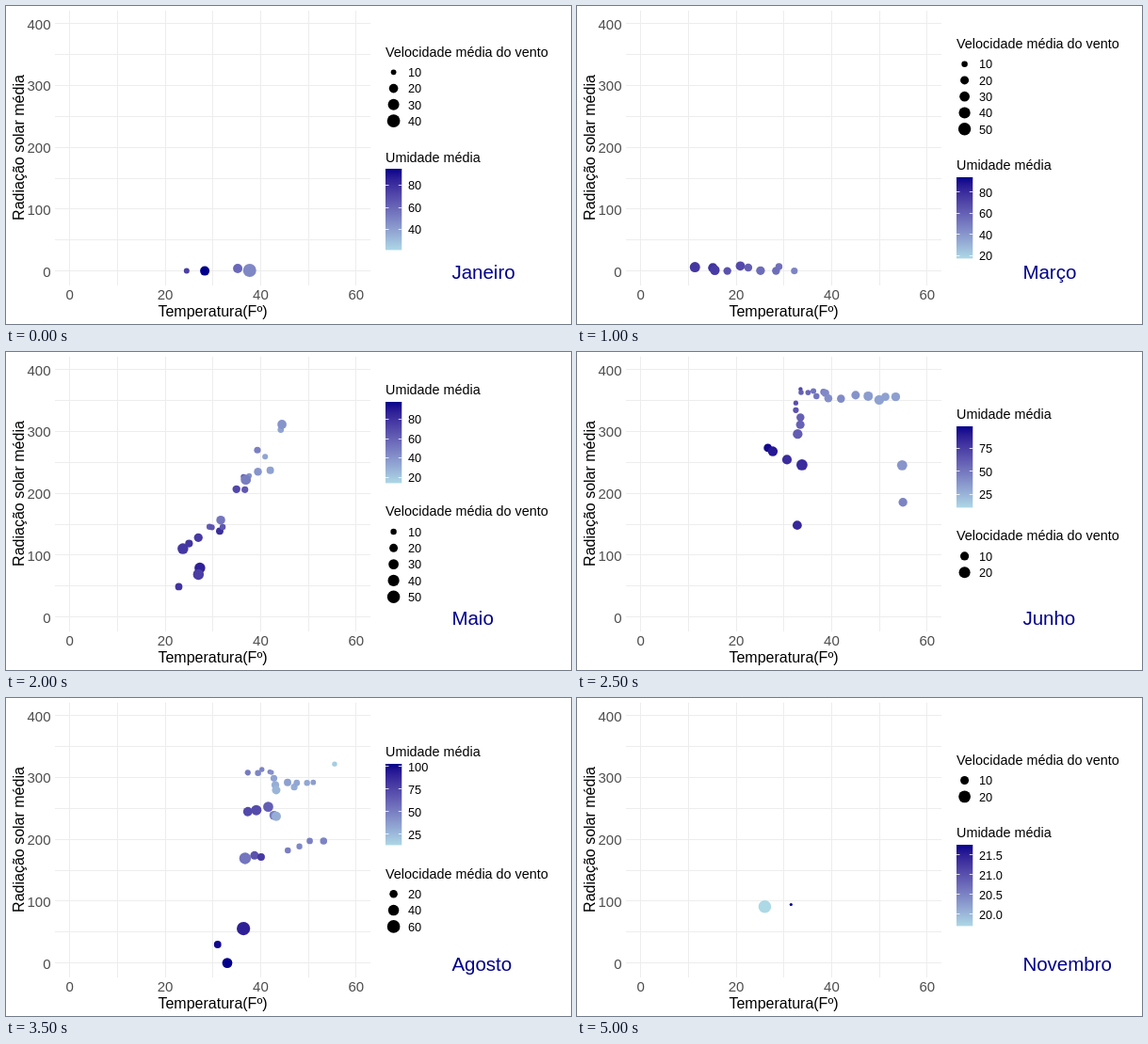
Recreate the animation shown at these times as an HTML page. Size 600 by 338 pixels, loop 5.5 s.

```html
<!DOCTYPE html>
<html lang="pt">
<head>
<meta charset="utf-8">
<style>
html, body { margin: 0; width: 100%; height: 100%; overflow: hidden; background: #fff; }
svg { display: block; width: 600px; height: 338px; font-family: "Liberation Sans", Arial, sans-serif; }
.grid { stroke: #ededed; shape-rendering: crispEdges; }
.axis { font-size: 15px; fill: #4d4d4d; }
.name { font-size: 16px; text-anchor: middle; }
.title { font-size: 14.4px; }
.label { font-size: 12.8px; }
.month { font-size: 20.5px; fill: #00008b; }
</style>
</head>
<body>
<svg id="stage" viewBox="0 0 600 338"></svg>
<script>
const STEP = 500, KEY = 17.28, BAR = 5 * KEY, LEFT = 403, HEAD = 13, GAP = 30;

const px = temp => 67.6 + 5.07 * temp;
const py = sun => 281.6 - .657 * sun;
const shade = p => `color-mix(in lab, #00008b ${p}%, #add8e6)`;
const text = (x, y, s, cls, more = '') => `<text x="${x}" y="${y}" class="${cls}" ${more}>${s}</text>`;
const dot = (x, y, r, fill) => `<circle cx="${x}" cy="${y}" r="${r}" fill="${fill}"/>`;
const range = (n, f) => Array.from({ length: n }, (_, i) => f(i));
const clamp = (v, lo, hi) => Math.min(hi, Math.max(lo, v));

// humidity and wind: lowest, highest, label step.
// strands: dot count, then key points of temperature, radiation, radius, darkness %.
const months = [
  { name: 'Janeiro', windFirst: true, humidity: [21.4, 94.9, 20], wind: [8, 41, 10], spread: 0,
    strands: [[4, [24.5, 0, 3, 72], [28.3, 0, 5, 100], [35.2, 4, 5, 52], [37.7, 1, 7, 37]]] },
  { name: 'Fevereiro', humidity: [13.4, 98.1, 20], wind: [9, 24, 5], spread: 0,
    strands: [[2, [12.6, 0, 3, 95], [12, 0, 5.5, 48]],
      [3, [19.6, 0, 4.5, 22], [21.2, 0, 6, 6], [25.8, 0, 4.5, 22]],
      [2, [29.9, 3, 1.6, 0], [32.8, 0, 6.8, 37]]] },
  { name: 'Março', windFirst: true, humidity: [17.4, 94.2, 20], wind: [5, 55, 10], spread: 1,
    strands: [[10, [12, 0, 5, 80], [32, 6, 4, 40]]] },
  { name: 'Abril', windFirst: true, humidity: [17.4, 94.2, 20], wind: [5, 55, 10], spread: 0,
    strands: [[4, [7, 0, 6.2, 92], [14.2, 0, 6.8, 75], [18.6, 0, 5.7, 82]],
      [3, [21.8, 15, 3, 42], [31.6, 40, 4.3, 38]],
      [4, [32.4, 13, 4.3, 75], [32.2, 35, 3.6, 10], [33, 57, 1.5, 36]]] },
  { name: 'Maio', humidity: [14, 98, 20], wind: [5, 55, 10], spread: 3,
    strands: [[22, [24, 60, 5, 85], [32, 180, 4, 55], [46, 300, 4, 25]]] },
  { name: 'Junho', humidity: [10.5, 99, 25], wind: [1, 29, 10], spread: .8,
    strands: [[1, [33, 144, 4.6, 85]], [4, [26, 272, 4.6, 96], [33, 243, 5.8, 78]],
      [6, [33, 298, 5, 55], [33, 364, 2.2, 65]],
      [13, [34, 362, 2.8, 52], [40, 358, 4.2, 36], [54, 354, 5, 22]],
      [2, [54.6, 245, 5.6, 34], [55, 184, 4.6, 42]]] },
  { name: 'Julho', windFirst: true, humidity: [10, 96, 25], wind: [8, 41, 10], spread: 3,
    strands: [[28, [36, 200, 5, 75], [42, 310, 4, 45], [54, 370, 4, 25]]] },
  { name: 'Agosto', humidity: [13, 103, 25], wind: [5, 63, 20], spread: .7,
    strands: [[3, [31, 33, 4.2, 98], [32.5, 0, 5.5, 100], [36, 54, 7, 90]],
      [3, [37, 172, 5.8, 45], [40, 172, 3.8, 78]],
      [5, [37.5, 240, 5.2, 70], [41, 248, 5.6, 58], [43.4, 237, 4.6, 18]],
      [8, [38, 305, 3.2, 40], [42, 312, 2.6, 36], [43, 283, 4.5, 15]],
      [5, [45, 288, 4, 22], [51, 288, 3, 26]], [1, [56, 323, 2.6, 8]],
      [4, [46, 182, 3.3, 42], [52.5, 202, 3.8, 36]]] },
  { name: 'Setembro', windFirst: true, humidity: [14.6, 101, 20], wind: [1, 63, 20], spread: 1.2,
    strands: [[1, [32.4, 13, 6.7, 97]],
      [10, [21.5, 105, 3, 65], [21, 200, 3.8, 92], [28, 238, 3.3, 70]],
      [5, [27, 185, 4, 60], [33, 150, 5.6, 60], [36, 180, 6.2, 54]],
      [12, [32, 203, 5, 60], [38, 210, 4, 35], [52, 238, 3, 10]]] },
  { name: 'Outubro', windFirst: true, humidity: [15, 99, 20], wind: [1, 63, 20], spread: 3,
    strands: [[24, [16, 70, 4, 90], [26, 130, 4, 60], [42, 165, 4, 20]]] },
  { name: 'Novembro', windFirst: true, humidity: [19.7, 21.76, .5], wind: [4, 24, 10], spread: 0,
    strands: [[2, [26, 91, 6.8, 0], [31.5, 94.5, 1.6, 100]]] }
];

// Point at t (0 to 1) on the polyline through the keys
function along(keys, t) {
  const pos = t * (keys.length - 1), i = Math.floor(pos);
  const a = keys[i], b = keys[i + 1] || a;
  return a.map((v, k) => v + (b[k] - v) * (pos - i));
}

function drawDots({ strands, spread }, month) {
  let seed = 7919 * (month + 1);
  const noise = () => ((seed = seed * 16807 % 2147483647) / 2147483647 * 2 - 1) * spread;
  return strands.flatMap(([n, ...keys]) => range(n, i => {
    const [temp, sun, r, dark] = along(keys, n > 1 ? i / (n - 1) : 0);
    return dot(px(temp + noise()), py(Math.max(0, sun + 7 * noise())),
      r * (1 + .12 * noise()), shade(clamp(dark + 5 * noise(), 0, 100)));
  })).join('');
}

// Round values between lo and hi
function breaks([lo, hi, step]) {
  const first = Math.ceil(lo / step);
  return range(Math.floor(hi / step) - first + 1, i => (first + i) * step);
}

function humidityLegend(y, scale) {
  const [lo, hi, step] = scale, top = Math.round(y + HEAD - .4);
  return text(LEFT, y + 5, 'Umidade média', 'title') +
    `<rect x="${LEFT}" y="${top}" width="${KEY}" height="${BAR}" fill="url(#scale)"/>` +
    breaks(scale).map(v => {
      const ty = top + (hi - v) / (hi - lo) * BAR;
      return `<path d="M${LEFT} ${Math.floor(ty) + .5}h3.5m10.3 0h3.5" stroke="#fff" stroke-width=".8"/>` +
        text(427, ty + 4.8, v.toFixed(step < 1 ? 1 : 0), 'label');
    }).join('');
}

function windLegend(y, scale) {
  const [lo, hi] = scale;
  return text(LEFT, y + 5, 'Velocidade média do vento', 'title') + breaks(scale).map((v, i) => {
    const ky = y + HEAD + KEY * (i + .5);
    const r = 1.5 + 5.5 * Math.sqrt((v - lo) / (hi - lo));
    return dot(411.6, ky, r, '#000') + text(427, ky + 4.8, v, 'label');
  }).join('');
}

function drawMonth(month, index) {
  const { name, windFirst, humidity, wind } = month;
  const windHeight = HEAD + KEY * breaks(wind).length, barHeight = HEAD + BAR;
  const top = 154.4 - (windHeight + barHeight + GAP) / 2;
  return drawDots(month, index) +
    humidityLegend(windFirst ? top + windHeight + GAP : top, humidity) +
    windLegend(windFirst ? top : top + barHeight + GAP, wind) +
    text(473.4, 290, name, 'month');
}

function drawAxes() {
  const stops = range(17, i =>
    `<stop offset="${i / 16}" style="stop-color:${shade(100 - i * 6.25)}"/>`).join('');
  const lines = range(7, i => `M${Math.floor(px(i * 10)) + .5} 5V297`).join('') +
    range(9, i => `M52 ${Math.floor(py(i * 50)) + .5}H387`).join('');
  return `<defs><linearGradient id="scale" x2="0" y2="1">${stops}</linearGradient></defs>` +
    `<path d="${lines}" class="grid"/>` +
    range(4, i => text(px(i * 20), 312, i * 20, 'axis', 'text-anchor="middle"')).join('') +
    range(5, i => text(47.5, py(i * 100) + 5.9, i * 100, 'axis', 'text-anchor="end"')).join('') +
    text(219.5, 330, 'Temperatura(Fº)', 'name') +
    text(0, 0, 'Radiação solar média', 'name', 'transform="translate(18.8 150.5) rotate(-90)"');
}

const stage = document.getElementById('stage');
stage.innerHTML = drawAxes() + '<g id="view"></g>';
const view = document.getElementById('view');
const pages = months.map(drawMonth);
const start = performance.now();
let shown = -1;

function tick() {
  const i = Math.floor((performance.now() - start) / STEP) % pages.length;
  if (i !== shown) view.innerHTML = pages[shown = i];
  requestAnimationFrame(tick);
}
tick();
</script>
</body>
</html>
```
